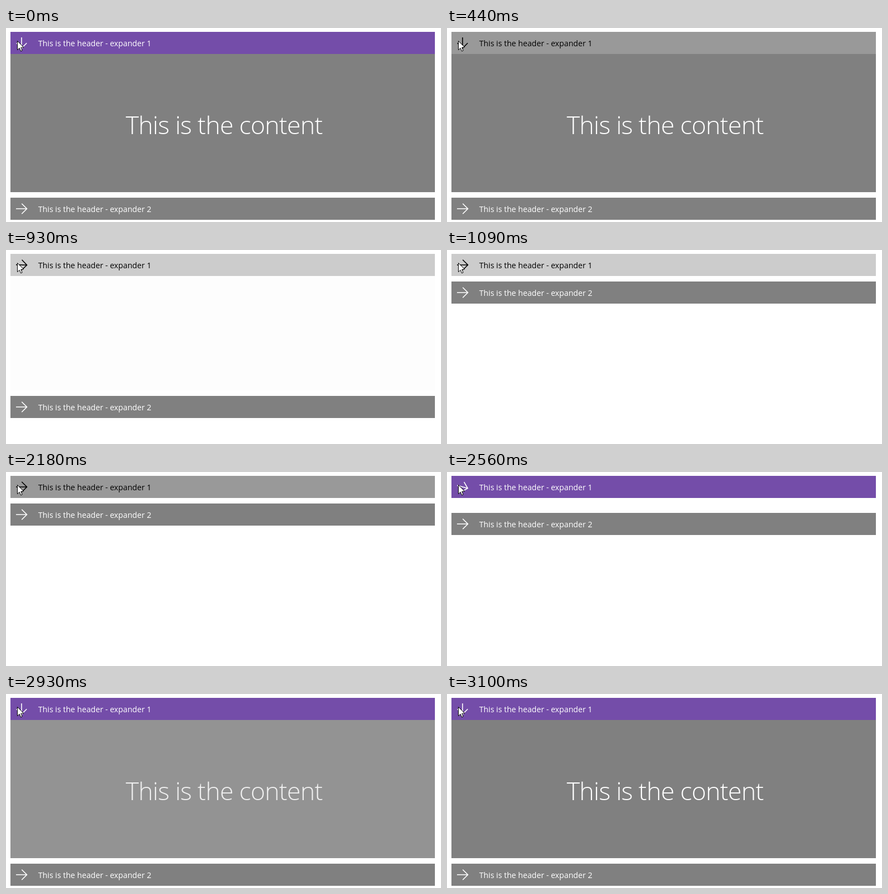
Animation, 783 px wide and 351 px high, one loop 3820 ms. Source, as an HTML page with a canvas:

```html
<!DOCTYPE html>
<html lang="en">
<head>
<meta charset="utf-8">
<title>Expander</title>
<style>
  html, body { margin: 0; width: 100%; height: 100%; overflow: hidden; background: #fff; }
  canvas { display: block; }
</style>
</head>
<body>
<canvas id="stage" width="783" height="351"></canvas>
<script>
const ctx = document.getElementById('stage').getContext('2d');
const LOOP = 3820;
const LEFT = 8, WIDTH = 764, BAR = 40, TOP = 7, GAP = 10, FULL = 250;
const PURPLE = '#744da9', GRAY = '#808080', HOVER = '#ccc', PRESSED = '#999';

// Each track is a list of [time, value]; repeated times are hard changes.
const FADE = [[510, 1], [940, 0], [2747, 0], [2960, 0.985], [3100, 0.985], [3100, 1]];
const TURN = [[510, 90], [940, 0], [2510, 0], [2814, 90]];
const CLOSE = [[895, 0], [930, 42], [950, 66], [990, 66], [990, 103], [1090, FULL]];

function track(t, points) {
  if (t < points[0][0]) return points[0][1];
  for (let i = 1; i < points.length; i++) {
    const [t0, v0] = points[i - 1], [t1, v1] = points[i];
    if (t < t1) return v0 + (v1 - v0) * (t - t0) / (t1 - t0);
  }
  return points[points.length - 1][1];
}

function contentHeight(t) {
  if (t < 2510) return FULL - Math.round(track(t, CLOSE));
  const p = Math.min(1, (t - 2510) / 304);
  return Math.round(FULL * (1 - Math.cos(Math.PI * p)) / 2);
}

function headerColors(t) {
  if (t < 440 || t >= 2510) return [PURPLE, '#fff'];
  const down = t < 510 || t >= 2180;
  return [down ? PRESSED : HOVER, '#000'];
}

function arrow(x, y, degrees, color) {
  ctx.save();
  ctx.translate(x, y);
  ctx.rotate(degrees * Math.PI / 180);
  ctx.strokeStyle = color;
  ctx.lineWidth = 1.6;
  ctx.beginPath();
  ctx.moveTo(-10, 0);
  ctx.lineTo(9.5, 0);
  ctx.moveTo(0.3, -9.3);
  ctx.lineTo(9.6, 0);
  ctx.lineTo(0.3, 9.3);
  ctx.stroke();
  ctx.restore();
}

function text(str, x, y, font, spacing, color) {
  ctx.font = font;
  ctx.letterSpacing = spacing;
  ctx.fillStyle = color;
  ctx.fillText(str, x, y);
}

function header(y, label, degrees, back, fore) {
  ctx.fillStyle = back;
  ctx.fillRect(LEFT, y, WIDTH, BAR);
  arrow(28, y + 20, degrees, fore);
  text(label, 58, y + 26, '14.2px "Open Sans", sans-serif', '0px', fore);
}

function content(height, alpha) {
  if (height <= 0 || alpha <= 0) return;
  const y = TOP + BAR;
  ctx.save();
  ctx.beginPath();
  ctx.rect(LEFT, y, WIDTH, height);
  ctx.clip();
  ctx.globalAlpha = alpha;
  ctx.fillStyle = GRAY;
  ctx.fillRect(LEFT, y, WIDTH, height);
  text('This is the content', 215.5, 191.5, '300 45px "Open Sans", sans-serif', '-0.8px', '#fff');
  ctx.restore();
}

function pointer(x, y) {
  const outline = [[0, 0], [0, 16.2], [3.7, 12.8], [6.2, 18.4], [8.7, 17.3], [6.3, 11.8], [11.3, 11.3]];
  ctx.beginPath();
  outline.forEach(([dx, dy]) => ctx.lineTo(x + dx, y + dy));
  ctx.closePath();
  ctx.fillStyle = '#fff';
  ctx.fill();
  ctx.strokeStyle = '#000';
  ctx.lineWidth = 1;
  ctx.stroke();
}

function draw(t) {
  const height = contentHeight(t);
  ctx.fillStyle = '#fff';
  ctx.fillRect(0, 0, 783, 351);
  content(height, track(t, FADE));
  header(TOP, 'This is the header - expander 1', track(t, TURN), ...headerColors(t));
  header(TOP + BAR + height + GAP, 'This is the header - expander 2', 0, GRAY, '#fff');
  pointer(20.5, 23.5);
}

const start = performance.now();
function tick() {
  draw((performance.now() - start) % LOOP);
  requestAnimationFrame(tick);
}
tick();
</script>
</body>
</html>
```
